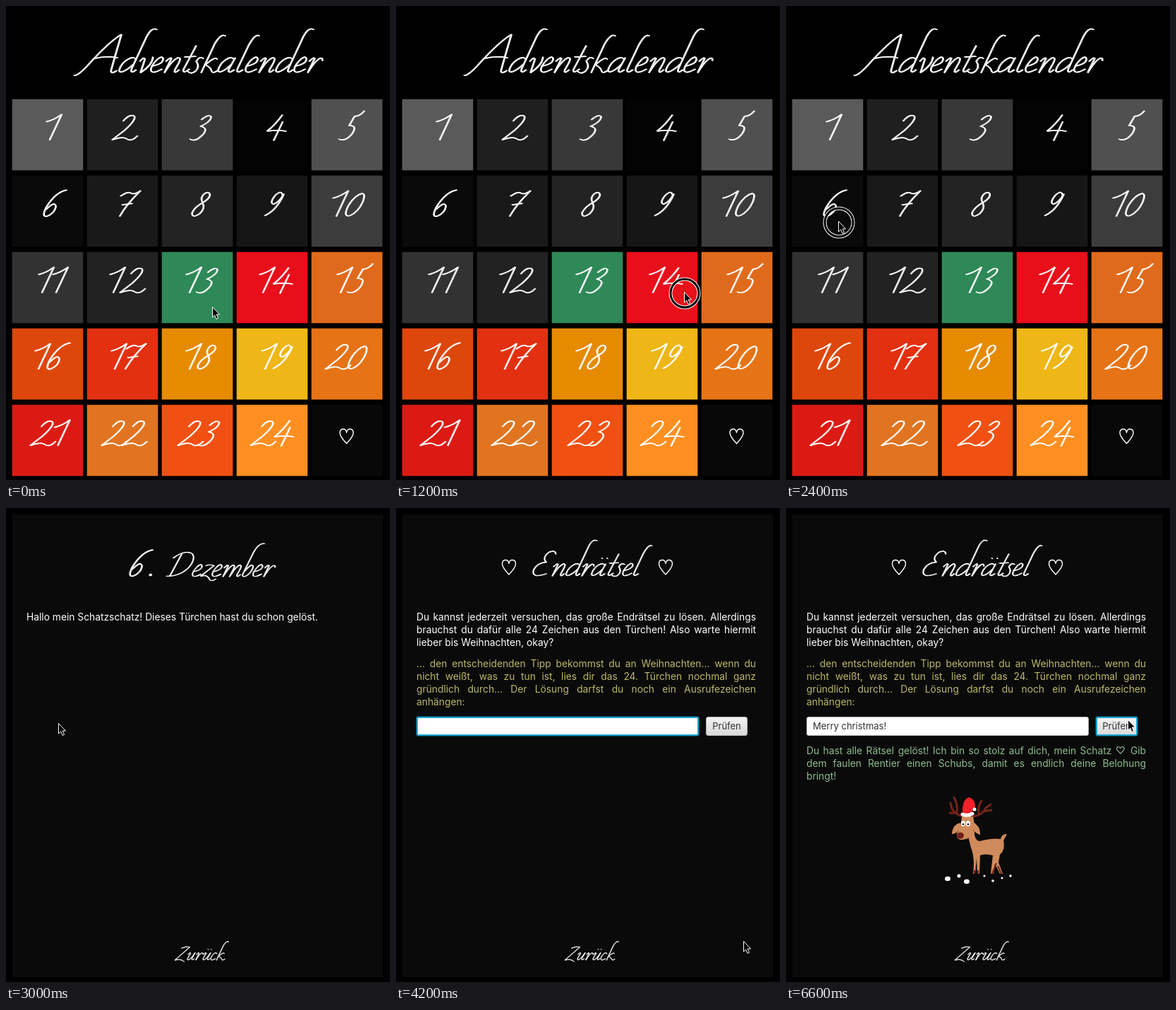
Animation of 544x670 px, one loop 7200 ms. Source, as an HTML page:

```html
<!DOCTYPE html>
<html lang="de">
<head>
<meta charset="utf-8">
<title>Adventskalender</title>
<style>
html, body { margin: 0; width: 100%; height: 100%; overflow: hidden; background: #000; }
#stage { position: relative; width: 544px; height: 670px; overflow: hidden; background: #000;
  font: 13.8px/18px Inter, Roboto, sans-serif; color: #fff; }
svg, .page { position: absolute; left: 0; top: 0; width: 544px; height: 670px; }
.page { background: #000; }
.page::before { content: ""; position: absolute; left: 9px; top: 9px; width: 525px; height: 654px; background: var(--bg); }
p { position: absolute; left: 29px; width: 481px; margin: 0; white-space: nowrap; }
p span { display: block; text-align-last: justify; }
p span:last-child { text-align-last: left; }
.hint { color: #bdb76b; }
.bad { color: #bc8f8f; }
.good { color: #8fbc8f; }
.box { position: absolute; left: 29px; width: 400px; height: 27px; box-sizing: border-box;
  border: 1px solid #b5b5b5; border-radius: 3px; background: #fff; color: #333; font-size: 13px; line-height: 25px; }
.box.btn { left: 439px; width: 59px; text-align: center; background: linear-gradient(#f4f4f4, #d9d9d9); }
.box .text { padding-left: 8px; }
.focus { position: absolute; inset: -1px; border: 2px solid #17a5d3; border-radius: 3px; box-shadow: 0 0 2px #17a5d3; box-sizing: border-box; }

/* one slot lasts 600 ms, twelve slots per loop; --n is the first visible slot */
.s1, .s2, .s5 { visibility: hidden; animation: show1 7200ms step-end calc(var(--n) * 600ms - 7200ms) infinite; }
.s2 { animation-name: show2; }
.s5 { animation-name: show5; }
@keyframes show1 { 0% { visibility: visible } 8.33333%, 100% { visibility: hidden } }
@keyframes show2 { 0% { visibility: visible } 16.66666%, 100% { visibility: hidden } }
@keyframes show5 { 0% { visibility: visible } 41.66666%, 100% { visibility: hidden } }
#mouse { animation: mouse 7200ms step-end infinite; }
@keyframes mouse {
  0% { transform: translate(292px, 425px) }
  16.66666% { transform: translate(408px, 404px) }
  33.33333% { transform: translate(74px, 304px) }
  50% { transform: translate(492px, 612px) }
  66.66666% { transform: translate(457px, 306px) }
  83.33333%, 100% { transform: translate(484px, 299px) }
}
.pen { fill: none; stroke: #fff; stroke-width: 1.2; stroke-linecap: round; stroke-linejoin: round; }
.heart { fill: none; stroke: #fff; stroke-width: 1.4; stroke-linejoin: round; }
</style>
</head>
<body>
<div id="stage">
  <svg id="cal">
    <g data-pen="Adventskalender" data-at="102 94 1"></g>
    <g id="doors"></g>
    <use href="#heart" x="482.5" y="607.5"/>
  </svg>

  <div class="page s1" style="--n:1; --bg:#2e8857">
    <svg>
      <g data-pen="13." data-at="156 96 .95"></g>
      <g data-pen="Dezember" data-at="237 97 .78"></g>
      <g data-pen="Zurück" data-at="239 639 .5"></g>
    </svg>
    <p style="top:145px">Hallo mein Schatzschatz! Willkommen beim Türchen von heute!</p>
    <p class="hint" style="top:175px"><span>Dieses Sudoku war nochmal ein kleines bisschen schwerer als das letzte.</span><span>Kennst du trotzdem die Lösung (Format wieder "1 2 3 4")?</span></p>
    <div class="box" style="top:223px"><i class="focus"></i></div>
    <div class="box btn" style="top:223px">Prüfen</div>
  </div>

  <div class="page s1" style="--n:3; --bg:#e80f1a">
    <svg>
      <g data-pen="14." data-at="156 96 .95"></g>
      <g data-pen="Dezember" data-at="237 97 .78"></g>
      <g data-pen="Zurück" data-at="239 639 .5"></g>
    </svg>
    <p style="top:145px">Dieses Türchen darfst du heute noch nicht öffnen!</p>
  </div>

  <div class="page s1" style="--n:5; --bg:#0a0a0a">
    <svg>
      <g data-pen="6." data-at="172 96 .95"></g>
      <g data-pen="Dezember" data-at="225 97 .78"></g>
      <g data-pen="Zurück" data-at="239 639 .5"></g>
    </svg>
    <p style="top:145px">Hallo mein Schatzschatz! Dieses Türchen hast du schon gelöst.</p>
  </div>

  <div class="page s5" style="--n:7; --bg:#0a0a0a">
    <svg>
      <use href="#heart" x="160" y="83"/>
      <g data-pen="Endrätsel" data-at="189 96 .82"></g>
      <use href="#heart" x="382" y="83"/>
      <g data-pen="Zurück" data-at="239 639 .5"></g>
    </svg>
    <p style="top:145px"><span>Du kannst jederzeit versuchen, das große Endrätsel zu lösen. Allerdings</span><span>brauchst du dafür alle 24 Zeichen aus den Türchen! Also warte hiermit</span><span>lieber bis Weihnachten, okay?</span></p>
    <p class="hint" style="top:211px"><span>... den entscheidenden Tipp bekommst du an Weihnachten... wenn du</span><span>nicht weißt, was zu tun ist, lies dir das 24. Türchen nochmal ganz</span><span>gründlich durch... Der Lösung darfst du noch ein Ausrufezeichen</span><span>anhängen:</span></p>
    <div class="box" style="top:295px">
      <i class="focus s2" style="--n:7"></i><i class="focus s1" style="--n:10"></i>
      <div class="text s2" style="--n:10">Merry christmas!</div>
    </div>
    <div class="box btn" style="top:295px">Prüfen<i class="focus s1" style="--n:9"></i><i class="focus s1" style="--n:11"></i></div>
    <p class="bad s1" style="--n:9; top:334px"><span>Das ist leider falsch, mein Liebling. Lös' erstmal alle kleinen Rätsel, dann</span><span>hast du genung Zeichen, um auch das hier zu lösen :)</span></p>
    <p class="good s1" style="--n:11; top:334px"><span>Du hast alle Rätsel gelöst! Ich bin so stolz auf dich, mein Schatz ♡ Gib</span><span>dem faulen Rentier einen Schubs, damit es endlich deine Belohung</span><span>bringt!</span></p>
    <svg class="s1" style="--n:11">
      <g fill="none" stroke="#74241b" stroke-width="3" stroke-linecap="round" stroke-linejoin="round">
        <path d="M252 436Q240 434 235 425L233 417M240 431L232 431M242 432Q244 420 238 409"/>
        <path d="M265 436Q279 434 283 424L290 419M273 432Q271 422 277 414M279 429L291 427"/>
      </g>
      <g fill="#d08b5c">
        <path d="M247 445Q236 447 235 461Q244 460 248 450ZM264 443Q276 450 275 462Q266 459 262 450Z"/>
        <path d="M249 436H265Q268 448 265 459Q260 469 248 469Q241 468 242 460Q248 452 249 436Z"/>
        <path d="M257 460L267 456Q266 469 274 471Q292 466 304 468Q306 460 313 461L308 470Q311 483 303 490L301 501L307 517H303L296 503L294 517H290L293 491Q282 488 275 491L274 517H271L270 495L268 517H265Q268 494 262 480Z"/>
      </g>
      <path d="M267 517V512M272 517V512M292 517L298 502M305 517L300 506" stroke="#74241b" stroke-width="2"/>
      <ellipse cx="247" cy="463" rx="5" ry="4.5" fill="#741d18"/>
      <g fill="#fff"><ellipse cx="251" cy="446" rx="3" ry="4"/><ellipse cx="258" cy="446" rx="3" ry="4"/></g>
      <circle cx="251" cy="447" r="1.3"/><circle cx="258" cy="447" r="1.3"/>
      <path d="M250 432Q249 412 259 409Q269 411 268 426Q264 421 264 432Z" fill="#f5202a"/>
      <path d="M250 433Q257 436 264 432" stroke="#fff" stroke-width="5" stroke-linecap="round" fill="none"/>
      <circle cx="267" cy="426" r="2.5" fill="#fff"/>
      <g fill="#fff">
        <ellipse cx="229" cy="524" rx="4" ry="3.2"/><circle cx="245" cy="520" r="2.5"/><ellipse cx="256" cy="528" rx="4" ry="3.2"/>
        <circle cx="281" cy="520" r="1.5"/><circle cx="293" cy="527" r="1.8"/><circle cx="306" cy="523" r="1.5"/><circle cx="318" cy="520" r="1.8"/>
      </g>
    </svg>
  </div>

  <svg>
    <defs>
      <path id="heart" class="heart" d="M0 11Q-9.500 1 -9.500 -4C-9.500 -11 -1 -11.500 0 -4.500C1 -11.500 9.500 -11 9.500 -4Q9.500 1 0 11Z"/>
      <g id="ring" fill="none">
        <circle r="20" stroke="#fff" stroke-width="5"/>
        <circle r="20" stroke="#000" stroke-width="3"/>
      </g>
    </defs>
    <use class="s1" style="--n:2" href="#ring" x="409" y="406"/>
    <use class="s1" style="--n:4" href="#ring" x="75" y="306"/>
    <use class="s1" style="--n:6" href="#ring" x="493" y="614"/>
    <path id="mouse" d="M.5 .5V15L3.700 12L6 17.500L8.500 16.400L6.200 11H10.500Z" stroke="#fff"/>
  </svg>
</div>

<script>
// upright script letters: advance width, then strokes; baseline at y = 0
const glyphs = {
  A: [54, 'M-4 4Q2 4 9 -11Q24 -44 37 -54Q42 -20 45 -3Q47 3 53 -3M14 -20Q30 -24 46 -21'],
  D: [46, 'M12 -43Q10 -20 8 -1M0 -34Q12 -48 28 -43C45 -36 42 0 2 -1'],
  E: [34, 'M28 -38Q24 -46 15 -41Q7 -31 18 -24Q3 -23 2 -11Q4 5 27 -4'],
  Z: [30, 'M4 -34Q14 -40 26 -37L0 0Q14 -5 28 4'],
  a: [24, 'M16 -19C9 -25 0 -17 0 -7C0 3 9 0 16 -12M17 -21L15 -5Q16 3 23 -4'],
  b: [20, 'M18 -60Q7 -62 5 -44L3 -4Q4 1 10 -1C18 -6 18 -22 12 -21Q8 -20 4 -10'],
  c: [16, 'M13 -18Q10 -24 4 -18C-2 -6 2 6 15 -4'],
  d: [26, 'M19 -19C12 -25 2 -17 2 -7C2 4 12 -1 19 -12M30 -61Q21 -65 20 -50L19 -6Q20 3 26 -4'],
  e: [18, 'M1 -9Q14 -12 13 -18Q10 -26 4 -18C-2 -6 2 6 17 -5'],
  k: [26, 'M15 -52Q7 -56 5 -40L4 0M18 -19Q14 -24 5 -11Q14 -8 18 -2Q21 2 26 -3'],
  l: [13, 'M13 -52Q6 -56 4 -38L3 -6Q4 3 11 -4'],
  m: [36, 'M0 -16Q4 -23 6 -20L5 0Q8 -18 14 -21Q19 -22 18 -12L17 0Q20 -18 26 -21Q31 -22 30 -12L29 -4Q30 3 35 -4'],
  n: [25, 'M0 -16Q4 -23 6 -20L5 0Q8 -18 15 -21Q20 -22 19 -12L18 -4Q19 3 24 -4'],
  r: [20, 'M0 -16Q4 -23 6 -20L5 0Q8 -17 13 -20Q17 -22 18 -17'],
  s: [14, 'M12 -20Q5 -24 4 -16Q13 -8 9 -2Q4 3 -2 -2'],
  t: [14, 'M8 -38L5 -5Q6 3 13 -5M-1 -22L14 -23'],
  u: [24, 'M0 -16Q4 -23 6 -20L4 -6Q4 2 10 -2Q16 -8 18 -21L16 -5Q17 3 23 -4'],
  v: [19, 'M0 -16Q4 -24 6 -18L8 0Q20 -10 16 -22'],
  z: [18, 'M1 -20Q8 -23 16 -20L0 -1Q10 -5 18 4Q24 10 30 4'],
  0: [24, 'M14 -34Q4 -32 1 -16Q0 2 10 -1Q20 -6 20 -22Q19 -34 13 -34'],
  1: [21, 'M-6 -27Q5 -30 12 -38L11 0'],
  2: [30, 'M4 -28Q8 -38 16 -36Q24 -32 12 -14L0 0Q14 -6 22 -1Q30 3 35 -6'],
  3: [24, 'M4 -30Q10 -38 16 -35Q20 -28 7 -20Q20 -18 16 -8Q10 4 0 -1'],
  4: [28, 'M12 -37Q8 -22 0 -13Q14 -15 28 -13M17 -27L16 1'],
  5: [24, 'M19 -43Q16 -35 8 -35L6 -21Q18 -22 16 -10Q12 3 0 -1'],
  6: [24, 'M20 -39Q5 -36 1 -14Q0 2 8 0Q17 -4 15 -14Q10 -24 2 -10'],
  7: [24, 'M-6 -30Q2 -38 8 -34Q14 -32 20 -38Q8 -18 6 0M2 -17L16 -19'],
  8: [22, 'M15 -31Q12 -38 6 -34Q1 -28 9 -20Q17 -12 12 -4Q4 4 0 -5Q0 -14 10 -21Q16 -26 15 -31'],
  9: [22, 'M15 -31Q10 -40 4 -31Q0 -20 7 -18Q14 -20 16 -33Q16 -9 2 -1'],
  '.': [10, 'M9 -3l1.500 1.500l-1.500 1l-1 -1.500z']
};
const dots = 'M6 -31l1 1M15 -31l1 1';
for (const [mark, base] of ['äa', 'üu']) glyphs[mark] = [glyphs[base][0], glyphs[base][1] + dots];

// repeating each stroke sideways gives the look of a broad nib
function write(text, x, y, scale) {
  let at = 0, strokes = '';
  for (const ch of text) {
    const [width, d] = glyphs[ch];
    strokes += `<path d="${d}" transform="translate(${at})"/>`;
    at += width;
  }
  const nib = [-.3, .6, 1.5].map(o => `<g transform="translate(${o} ${o * .35})">${strokes}</g>`).join('');
  return `<g class="pen" role="img" aria-label="${text}" transform="translate(${x} ${y}) scale(${scale}) skewX(-24)">${nib}</g>`;
}

const colors = `5a5a5a 1f1f1f 383838 030303 505050 0a0a0a 191919 232323 161616 3c3c3c 323232 222222 2e8857
  e80f1a e06a1c dd470c e23010 e68a00 eeb616 e67316 dc1a14 e07420 f05012 ff8f20 080808`.split(/\s+/);
const inset = [41, 34, 38, 36, 37, 40, 39, 39, 36, 23, 30, 25, 27, 25, 29, 25, 27, 27, 28, 18, 24, 19, 21, 18];
document.getElementById('doors').innerHTML = colors.map((color, i) => {
  const x = 9 + i % 5 * 106, y = 132 + Math.floor(i / 5) * 108;
  const label = i < 24 ? write(String(i + 1), x + inset[i] + 1, y + 57, .95) : '';
  return `<rect x="${x - .3}" y="${y - .3}" width="100.6" height="100.6" fill="#${color}"/>${label}`;
}).join('');

for (const g of document.querySelectorAll('[data-pen]'))
  g.innerHTML = write(g.dataset.pen, ...g.dataset.at.split(' '));
</script>
</body>
</html>
```
